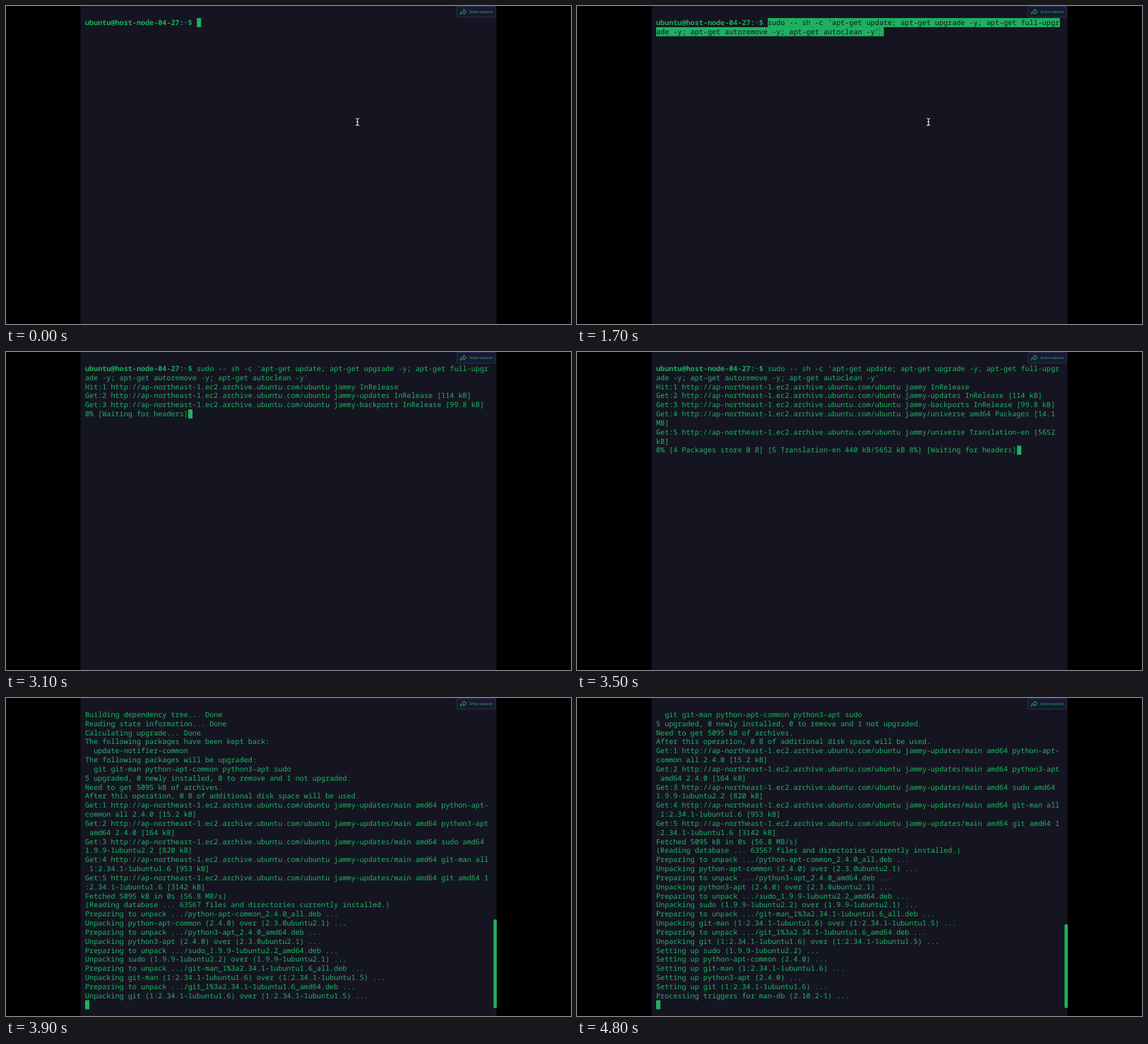
An HTML page that plays this animation: 800 by 450 pixels, repeating every 5 s.

```html
<!DOCTYPE html>
<html lang="en">
<head>
<meta charset="utf-8">
<title>Terminal upgrade</title>
<style>
html, body { margin: 0; width: 100%; height: 100%; overflow: hidden; background: #000; }
svg { display: block; width: 100vw; height: 100vh; }
.mono text { font: 10.14px "Noto Sans Mono", "DejaVu Sans Mono", monospace; white-space: pre; text-rendering: geometricPrecision; fill: #1eb762; }
.mono .prompt { font-weight: 700; fill: #1cae5d; }
.mono .picked { fill: #151521; }
.share { font: 500 5px Inter, "Open Sans", sans-serif; fill: #1fa65c; text-rendering: geometricPrecision; }
</style>
</head>
<body>
<svg id="stage" viewBox="0 0 800 450">
  <rect width="800" height="450" fill="#000"/>
  <rect x="105.5" width="589" height="450" fill="#151521"/>
  <g id="blocks" fill="#1eb160"></g>
  <g id="term" class="mono"></g>
  <rect id="thumb" x="690.3" width="4.6" rx="2" fill="#1eb160"/>
  <rect x="638.6" y="0.4" width="54.4" height="15.4" rx="1.5" fill="#19192e" stroke="#30335f" stroke-width="0.9"/>
  <path d="M643.6 12 C643.4 8.2 645.4 6.7 648.2 6.7 V4.5 L652 8 L648.2 11.4 V9.2 C645.8 9.2 644.4 10 643.6 12 Z" fill="none" stroke="#1fb160" stroke-width="1" stroke-linejoin="round"/>
  <text class="share" x="656" y="10">Share session</text>
  <g id="mouse" fill="none" stroke-linecap="square">
    <path id="beam" d="M495.3 159 Q497.6 159 497.6 161 V167 Q497.6 169 495.3 169 M499.9 159 Q497.6 159 497.6 161 M497.6 167 Q497.6 169 499.9 169 M496.4 164 H498.8" stroke="#08080d" stroke-width="3"/>
    <path d="M495.3 159 Q497.6 159 497.6 161 V167 Q497.6 169 495.3 169 M499.9 159 Q497.6 159 497.6 161 M497.6 167 Q497.6 169 499.9 169 M496.4 164 H498.8" stroke="#e4e4e8" stroke-width="1.2"/>
  </g>
</svg>
<script>
const LOOP = 5000, COLS = 94, ROWS = 33;
const X = 112, TOP = 17.1, CW = 6.084, LH = 12.83;
const HIDDEN = 64; // scrollback rows that pass too fast to be seen

const host = "ubuntu@host-node-04-27:";
const promptLen = host.length + 3;
const command = "sudo -- sh -c 'apt-get update; apt-get upgrade -y; apt-get full-upgrade -y; apt-get autoremove -y; apt-get autoclean -y'";
const repo = "http://ap-northeast-1.ec2.archive.ubuntu.com/ubuntu jammy";

const unpack = (name, file, to, from) => [
  `Preparing to unpack .../${file}.deb ...`,
  `Unpacking ${name} (${to}) over (${from}) ...`
];
const setUp = (name, version) => `Setting up ${name} (${version}) ...`;
const gitVersion = "1:2.34.1-1ubuntu1.6", gitOld = "1:2.34.1-1ubuntu1.5";

const log = [
  `Hit:1 ${repo} InRelease`,
  `Get:2 ${repo}-updates InRelease [114 kB]`,
  `Get:3 ${repo}-backports InRelease [99.8 kB]`,
  `Get:4 ${repo}/universe amd64 Packages [14.1 MB]`,
  `Get:5 ${repo}/universe Translation-en [5652 kB]`,
  "Reading package lists... Done",
  "Reading package lists... Done",
  "Building dependency tree... Done",
  "Reading state information... Done",
  "Calculating upgrade... Done",
  "The following packages have been kept back:",
  "  update-notifier-common",
  "The following packages will be upgraded:",
  "  git git-man python-apt-common python3-apt sudo",
  "5 upgraded, 0 newly installed, 0 to remove and 1 not upgraded.",
  "Need to get 5095 kB of archives.",
  "After this operation, 0 B of additional disk space will be used.",
  ...[
    "python-apt-common all 2.4.0 [15.2 kB]",
    "python3-apt amd64 2.4.0 [164 kB]",
    "sudo amd64 1.9.9-1ubuntu2.2 [820 kB]",
    `git-man all ${gitVersion} [953 kB]`,
    `git amd64 ${gitVersion} [3142 kB]`
  ].map((p, i) => `Get:${i + 1} ${repo}-updates/main amd64 ${p}`),
  "Fetched 5095 kB in 0s (56.8 MB/s)",
  "(Reading database ... 63567 files and directories currently installed.)",
  ...unpack("python-apt-common", "python-apt-common_2.4.0_all", "2.4.0", "2.3.0ubuntu2.1"),
  ...unpack("python3-apt", "python3-apt_2.4.0_amd64", "2.4.0", "2.3.0ubuntu2.1"),
  ...unpack("sudo", "sudo_1.9.9-1ubuntu2.2_amd64", "1.9.9-1ubuntu2.2", "1.9.9-1ubuntu2.1"),
  ...unpack("git-man", "git-man_1%3a2.34.1-1ubuntu1.6_all", gitVersion, gitOld),
  ...unpack("git", "git_1%3a2.34.1-1ubuntu1.6_amd64", gitVersion, gitOld),
  setUp("sudo", "1.9.9-1ubuntu2.2"),
  setUp("python-apt-common", "2.4.0"),
  setUp("git-man", gitVersion),
  setUp("python3-apt", "2.4.0"),
  setUp("git", gitVersion),
  "Processing triggers for man-db (2.10.2-1) ..."
];

// [start ms, log lines printed, status line]
const steps = [
  [0, 0, ""],
  [2900, 0, "0% [Working]"],
  [3100, 3, "0% [Waiting for headers]"],
  [3300, 4, "0% [4 Packages 0 B/14.1 MB 0%] [Waiting for headers]"],
  [3400, 5, "0% [4 Packages store 0 B] [5 Translation-en 0 B/5652 kB 0%] [Waiting for headers]"],
  [3500, 5, "0% [4 Packages store 0 B] [5 Translation-en 440 kB/5652 kB 8%] [Waiting for headers]"],
  [3600, 23, ""],
  [3700, 32, ""]
];

const $ = id => document.getElementById(id);
const add = (parent, tag, attrs = {}) => {
  const el = document.createElementNS("http://www.w3.org/2000/svg", tag);
  for (const k in attrs) el.setAttribute(k, attrs[k]);
  return parent.appendChild(el);
};
const show = (el, on) => el.setAttribute("visibility", on ? "visible" : "hidden");
const baseline = row => TOP + row * LH + 9.9;

const rowEls = Array.from({ length: ROWS }, (_, i) => add($("term"), "text", { x: X, y: baseline(i) }));
const prompt = add($("term"), "text", { x: X, y: baseline(0), class: "prompt" });
add(prompt, "tspan").textContent = host;
add(prompt, "tspan", { fill: "#34517f" }).textContent = "~";
add(prompt, "tspan").textContent = "$";
const cursor = add($("blocks"), "rect");
const picks = [add($("blocks"), "rect"), add($("blocks"), "rect")];

function block(el, row, from, to) {
  const box = { x: X + from * CW, y: TOP + row * LH, width: (to - from) * CW, height: LH };
  for (const k in box) el.setAttribute(k, box[k]);
}

function wrap(line) {
  const out = [];
  for (let i = 0; i < line.length; i += COLS) out.push(line.slice(i, i + COLS));
  return out;
}

function draw(t) {
  const pasted = t >= 1700, running = t >= 2800;
  const step = steps.filter(s => t >= s[0]).pop();
  const count = t >= 3800 ? Math.min(log.length, 33 + Math.floor((t - 3800) / 100)) : step[1];
  const status = step[2];

  let rows = wrap(" ".repeat(promptLen) + (pasted ? command : ""));
  if (running) rows = rows.concat(log.slice(0, count).flatMap(wrap), status);
  const skip = Math.max(0, rows.length - ROWS);
  const view = rows.slice(skip);

  const picked = pasted && !running;
  rowEls.forEach((el, i) => {
    const s = view[i] || "";
    if (el.textContent !== s) el.textContent = s;
    el.setAttribute("class", picked ? "picked" : "");
  });
  show(prompt, skip === 0);

  const last = view.length - 1, col = view[last].length;
  block(cursor, last, col, col + 1);
  block(picks[0], 0, promptLen, COLS);
  block(picks[1], 1, 0, promptLen + command.length - COLS);
  picks.forEach(p => show(p, picked));

  const h = 13568 / (rows.length + HIDDEN);
  $("thumb").setAttribute("y", 439 - h);
  $("thumb").setAttribute("height", h);
  show($("thumb"), skip > 0);
  show($("mouse"), t < 2500);
}

const start = performance.now();
function tick() {
  draw((performance.now() - start) % LOOP);
  requestAnimationFrame(tick);
}
tick();
</script>
</body>
</html>
```
